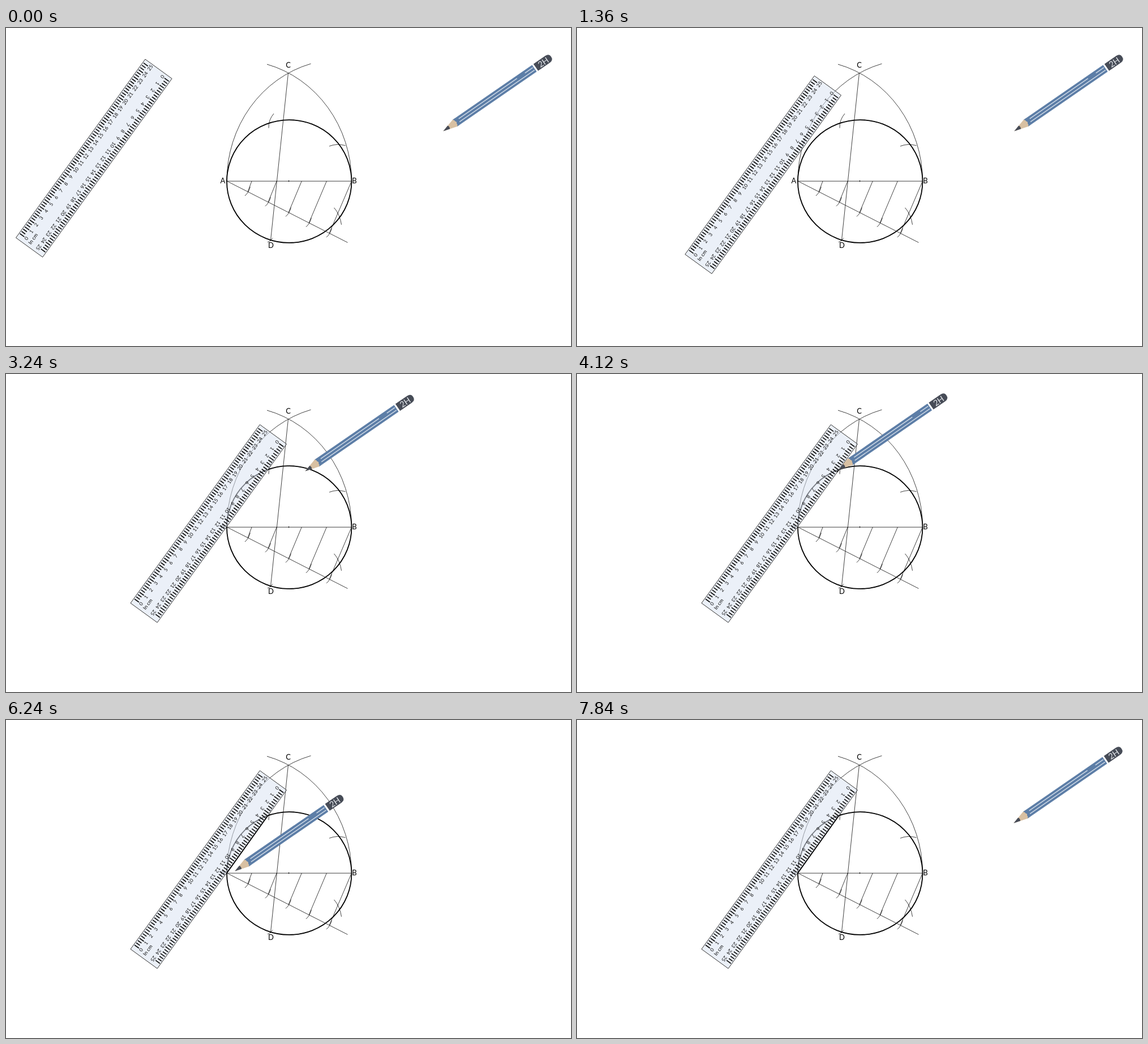
Write an HTML page that moves like this. It is 998 px wide and 561 px high and loops after 7880 ms.

```html
<!DOCTYPE html>
<html lang="en">
<head>
<meta charset="utf-8">
<title>Pentagon construction</title>
<style>
  html, body { margin: 0; width: 100%; height: 100%; overflow: hidden; background: #fff; }
  svg { display: block; width: 998px; height: 561px; font-family: Carlito, Lato, sans-serif; }
  .thin { fill: none; stroke: #111; stroke-width: .8; }
  .bold { fill: none; stroke: #000; stroke-width: 1.8; }
  .label { font-size: 13px; text-anchor: middle; }
  #scale text { font-size: 8.8px; text-anchor: middle; fill: #111; }
</style>
</head>
<body>
<svg viewBox="0 0 998 561">
  <g class="thin">
    <path d="M390 270A202 214.6 0 0 1 538.5 63M610.5 270A202 214.6 0 0 0 461 64"/>
    <path d="M390 270.2H610.5M498.5 79.5L467.3 376M462 378Q467 376 471 370.5"/>
    <path d="M390 270L603.5 378.5"/>
    <path d="M473 151Q463.5 162 464 176.5M571 208.5Q585 203 599.5 207.5M579.5 317Q590 329 592.5 347"/>
    <path id="divisions"/>
  </g>
  <circle cx="499.5" cy="270" r=".9"/>
  <ellipse class="bold" cx="500.2" cy="270.5" rx="110.2" ry="108.4"/>
  <g class="label">
    <text x="383" y="273.7">A</text>
    <text x="615.5" y="273.7">B</text>
    <text x="498.5" y="70.2">C</text>
    <text x="468" y="388.4">D</text>
  </g>

  <g id="ruler">
    <g transform="translate(17.5 370) rotate(-54.05)">
      <rect width="389" height="58.3" fill="#dae3f3" fill-opacity=".55" stroke="#333" stroke-width=".9"/>
      <g id="scale">
        <path id="ticks" stroke="#111" stroke-width="1.7"/>
      </g>
      <use href="#scale" transform="rotate(180 196 29.15)"/>
      <text x="5.5" y="28.7" font-size="9">In cm</text>
    </g>
  </g>

  <line id="side" class="bold" x1="463" y1="168"/>

  <g id="pencil">
    <g transform="translate(772.3 182) rotate(-34.55)">
      <path d="M0 0L25 -7.2H30V7.2H25Z" fill="#d8c0a2"/>
      <path d="M0 0L12 -3.5Q14 0 12 3.5Z" fill="#474c57"/>
      <path d="M25 -7.2H195.5V7.2H25Q28 5 27 2.6Q30 0 27 -2.6Q28 -5 25 -7.2Z" fill="#5d7ea7"/>
      <path d="M35 -2.6H160M177 -2.6H194M33 2.7H194" stroke="#e3eaf2" stroke-width="1.2"/>
      <path d="M198.5 -7.3H224Q231.5 -7 231.5 0T224 7.3H198.5Z" fill="#474c57"/>
      <text x="214.5" y="5.3" font-size="14.5" text-anchor="middle" fill="#e6e9ed">2H</text>
    </g>
  </g>
</svg>
<script>
  const LOOP = 7880, STEP = 40, MOVE = 1705;
  const $ = id => document.getElementById(id);

  // Parallel division lines, each with a small compass arc.
  $('divisions').setAttribute('d', [1, 2, 3, 4, 5].map(i => {
    const x = 391 + 36 * i, y = 270.7 + 18.3 * i;
    return `M${390 + 44.1 * i} 270L${x} ${y}` +
      `M${x + 4.3} ${y - 9}Q${x + 2} ${y + 1} ${x - 5} ${y + 7}`;
  }).join(''));

  // Ruler scale: three ticks per unit, numbered 0 to 25.
  const UNIT = 14.88;
  let ticks = '';
  for (let i = 0; i <= 75; i++) {
    ticks += `M${10 + i * UNIT / 3} 1.5V${i % 3 ? 9.5 : 11}`;
  }
  $('ticks').setAttribute('d', ticks);
  for (let n = 0; n <= 25; n++) {
    const text = document.createElementNS('http://www.w3.org/2000/svg', 'text');
    text.setAttribute('x', 10 + n * UNIT);
    text.setAttribute('y', 18.8);
    text.textContent = n;
    $('scale').append(text);
  }

  const rulerMoves = [[112, 202.5, 34.2]];
  const pencilMoves = [[2092, -310, -13.4], [4045, -382.5, 88], [6006, -1, 0]];

  const clamp = u => Math.min(1, Math.max(0, u));
  const ease = u => u < .5 ? 2 * u * u : 1 - 2 * (1 - u) ** 2;

  // Each move is [start time, x, y], eased from wherever the last one ended.
  function offset(moves, t) {
    let x = 0, y = 0;
    for (const [start, toX, toY] of moves) {
      const k = ease(clamp((t - start) / MOVE));
      x += (toX - x) * k;
      y += (toY - y) * k;
    }
    return [x, y];
  }

  function place(id, moves, t) {
    $(id).setAttribute('transform', `translate(${offset(moves, t)})`);
  }

  function draw(now) {
    const t = Math.floor((now % LOOP) / STEP) * STEP;
    place('ruler', rulerMoves, t);
    place('pencil', pencilMoves, t);
    const drawn = clamp((t - 4045) / MOVE * 1.1);
    const side = $('side');
    side.setAttribute('x2', 463 - 73 * drawn);
    side.setAttribute('y2', 168 + 102 * drawn);
    side.style.visibility = drawn > 0 ? 'visible' : 'hidden';
    requestAnimationFrame(draw);
  }
  draw(performance.now());
</script>
</body>
</html>
```
